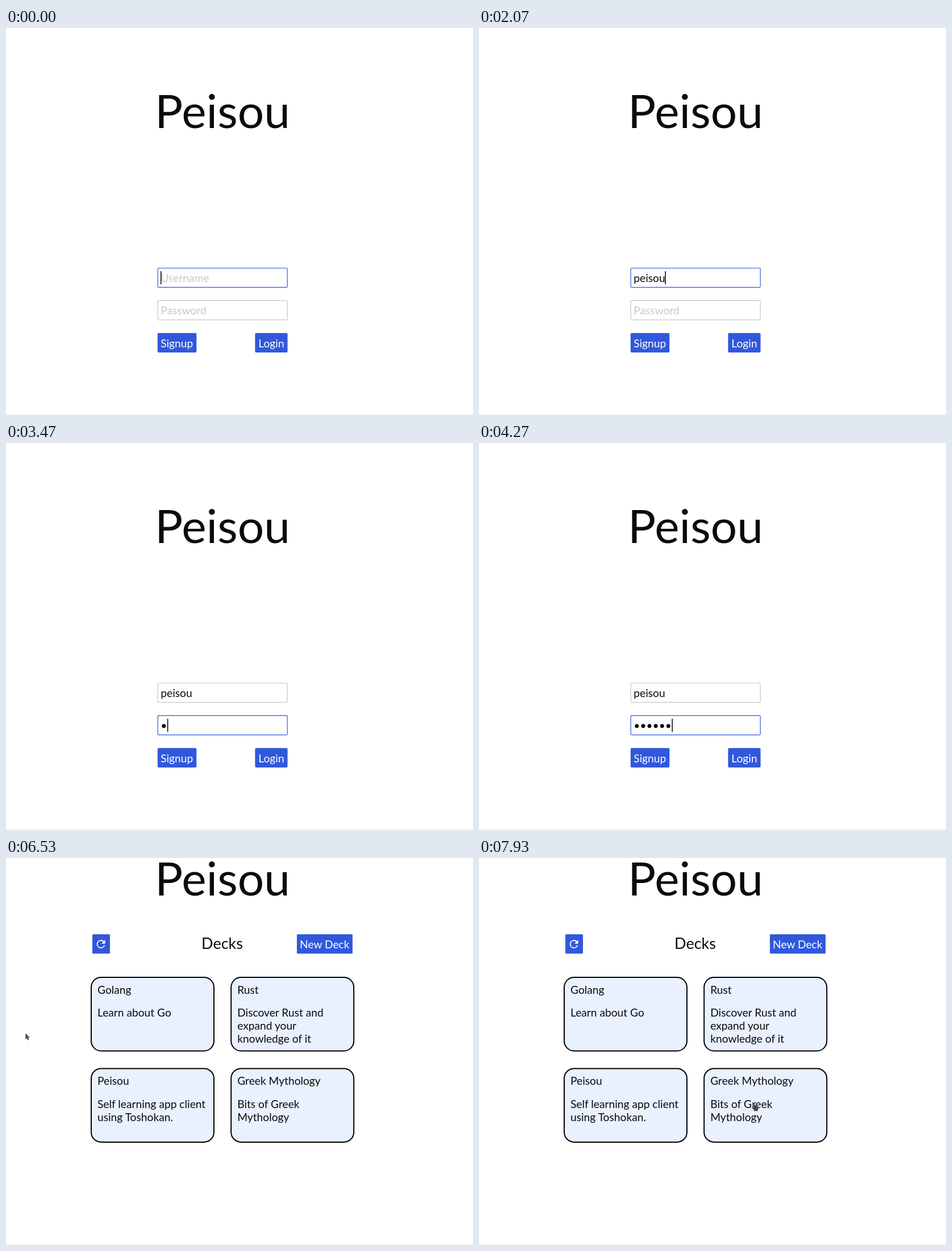
Recreate the animation shown at these times as an HTML page. Size 822 by 681 pixels, loop 8 s.

```html
<!DOCTYPE html>
<html lang="en">
<head>
<meta charset="utf-8">
<title>Flash cards</title>
<style>
  html, body { margin: 0; width: 100%; height: 100%; overflow: hidden; background: #fff; }
  svg { display: block; width: 822px; height: 681px; }
  text { font: 19.2px Lato, sans-serif; fill: #0b0b0d; }
  .title { font-size: 82px; text-anchor: middle; }
  .heading { font-size: 27px; text-anchor: middle; }
  .button { fill: #3158dc; }
  .label { fill: #fff; text-anchor: middle; }
  .field { fill: #fff; stroke: #c6c6c6; stroke-width: 1.2; }
  .field.focus { stroke: #3158dc; }
  .hint { fill: #c9c9c9; }
  .card { fill: #e9f0fe; stroke: #000; stroke-width: 2; }
  .pointer { fill: #454545; stroke: #fff; stroke-width: .8; stroke-linejoin: round; paint-order: stroke; }
</style>
</head>
<body>
<svg viewBox="0 0 822 681">
  <rect y="680" width="822" height="1" fill="#ececec"/>

  <g id="login">
    <text class="title" x="381" y="176">Peisou</text>
    <rect id="userBox" class="field" x="267.2" y="422.5" width="228" height="33.9" rx="1.5"/>
    <rect id="passBox" class="field" x="267.2" y="479.7" width="228" height="33.9" rx="1.5"/>
    <text id="userHint" class="hint" x="272.3" y="447">Username</text>
    <text id="passHint" class="hint" x="272.3" y="504">Password</text>
    <text id="user" x="272.3" y="447"></text>
    <g id="dots"></g>
    <rect id="caret" width="1.5" height="23" fill="#000"/>
    <rect class="button" x="266.8" y="536.8" width="68.5" height="34.2" rx="2"/>
    <text class="label" x="300.7" y="561.8">Signup</text>
    <rect class="button" x="438.4" y="536.8" width="57.2" height="34.2" rx="2"/>
    <text class="label" x="467" y="561.8">Login</text>
  </g>

  <g id="decks">
    <text class="title" x="381" y="65.5">Peisou</text>
    <rect class="button" x="152" y="134.3" width="31" height="34" rx="1.5"/>
    <g transform="translate(155.9 140.4) scale(.93)">
      <path fill="#fff" d="M17.65 6.35A8 8 0 1 0 19.73 14H17.65A6 6 0 1 1 12 6a5.9 5.9 0 0 1 4.22 1.78L13 11h7V4z"/>
    </g>
    <text class="heading" x="380.5" y="160">Decks</text>
    <rect class="button" x="512" y="134.3" width="98" height="34" rx="1.5"/>
    <text class="label" x="560.8" y="159">New Deck</text>
    <g id="cards"></g>
  </g>

  <path id="arrow" class="pointer" d="M.9 .6V11.2L3.4 9 5.1 12.8 7 12 5.4 8.3H8.6Z"/>
  <path id="hand" class="pointer" d="M3.1 1.2Q4.3.2 5 1.6L6.1 5.2 7.4 5 8.6 5.4 9.8 5.5 11 6.3Q12.2 7 12.2 9V11.5L11.2 13.2V15.2H4.8V13.7L1 9.8Q.7 8.4 2.2 8.6L3.8 9.7 2.5 2.6Q2.3 1.7 3.1 1.2Z"/>
</svg>
<script>
const LOOP = 8000, LEFT = 272, DOT_STEP = 11.1;
const FOCUS_PASS = 2670, LOGGED_IN = 4670;
const NAME = 'peisou';
const nameKeys = [1270, 1330, 1530, 1730, 1930, 2070];
const passKeys = [3470, 3530, 3800, 3930, 4070, 4270];

// time, x, y, shape
const moves = [
  [6530, 33.5, 308, 'arrow'], [6670, 88, 328, 'arrow'],
  [6800, 238, 388, 'hand'], [6930, 337, 424, 'hand'],
  [7070, 350, 428, 'hand'], [7200, 370, 433, 'arrow'],
  [7330, 391, 439, 'arrow'], [7400, 403, 442, 'hand'],
  [7730, 457.5, 442, 'hand'], [7870, 472, 436, 'hand'],
  [7930, 479.5, 430, 'hand']
];

const decks = [
  ['Golang', 'Learn about Go'],
  ['Rust', 'Discover Rust and', 'expand your', 'knowledge of it'],
  ['Peisou', 'Self learning app client', 'using Toshokan.'],
  ['Greek Mythology', 'Bits of Greek', 'Mythology']
];

const $ = id => document.getElementById(id);
const show = (id, on) => { $(id).style.display = on ? '' : 'none'; };
const count = (keys, t) => keys.filter(k => k <= t).length;

function add(parent, tag, attrs, content = '') {
  const el = document.createElementNS('http://www.w3.org/2000/svg', tag);
  for (const key in attrs) el.setAttribute(key, attrs[key]);
  el.textContent = content;
  parent.append(el);
  return el;
}

decks.forEach(([name, ...lines], i) => {
  const x = 150 + (i % 2) * 246.2, y = 210 + (i >> 1) * 160.4;
  add($('cards'), 'rect', { class: 'card', x, y, width: 216, height: 129.5, rx: 17.5 });
  add($('cards'), 'text', { x: x + 11, y: y + 28.7 }, name);
  lines.forEach((line, n) =>
    add($('cards'), 'text', { x: x + 11, y: y + 69.2 + n * 23 }, line));
});

const dots = passKeys.map((_, i) =>
  add($('dots'), 'circle', { cx: LEFT + .3 + DOT_STEP * (i + .5), cy: 498, r: 3.4 }));

function drawLogin(t) {
  const typed = count(nameKeys, t), secret = count(passKeys, t);
  const onPass = t >= FOCUS_PASS;
  $('user').textContent = NAME.slice(0, typed);
  show('userHint', !typed);
  show('passHint', !secret);
  $('userBox').classList.toggle('focus', !onPass);
  $('passBox').classList.toggle('focus', onPass);
  dots.forEach((dot, i) => dot.setAttribute('visibility', i < secret ? 'visible' : 'hidden'));
  const width = onPass ? secret * DOT_STEP : typed && $('user').getComputedTextLength();
  $('caret').setAttribute('x', LEFT + width + (onPass && secret ? .8 : 0));
  $('caret').setAttribute('y', onPass ? 485.3 : 428);
}

function drawPointer(t) {
  const move = moves.filter(m => m[0] <= t).pop();
  for (const shape of ['arrow', 'hand']) show(shape, move && move[3] === shape);
  if (move) $(move[3]).setAttribute('transform', `translate(${move[1]} ${move[2]})`);
}

const start = performance.now();
function draw() {
  const t = (performance.now() - start) % LOOP;
  show('login', t < LOGGED_IN);
  show('decks', t >= LOGGED_IN);
  if (t < LOGGED_IN) drawLogin(t);
  drawPointer(t);
  requestAnimationFrame(draw);
}
draw();
</script>
</body>
</html>
```
